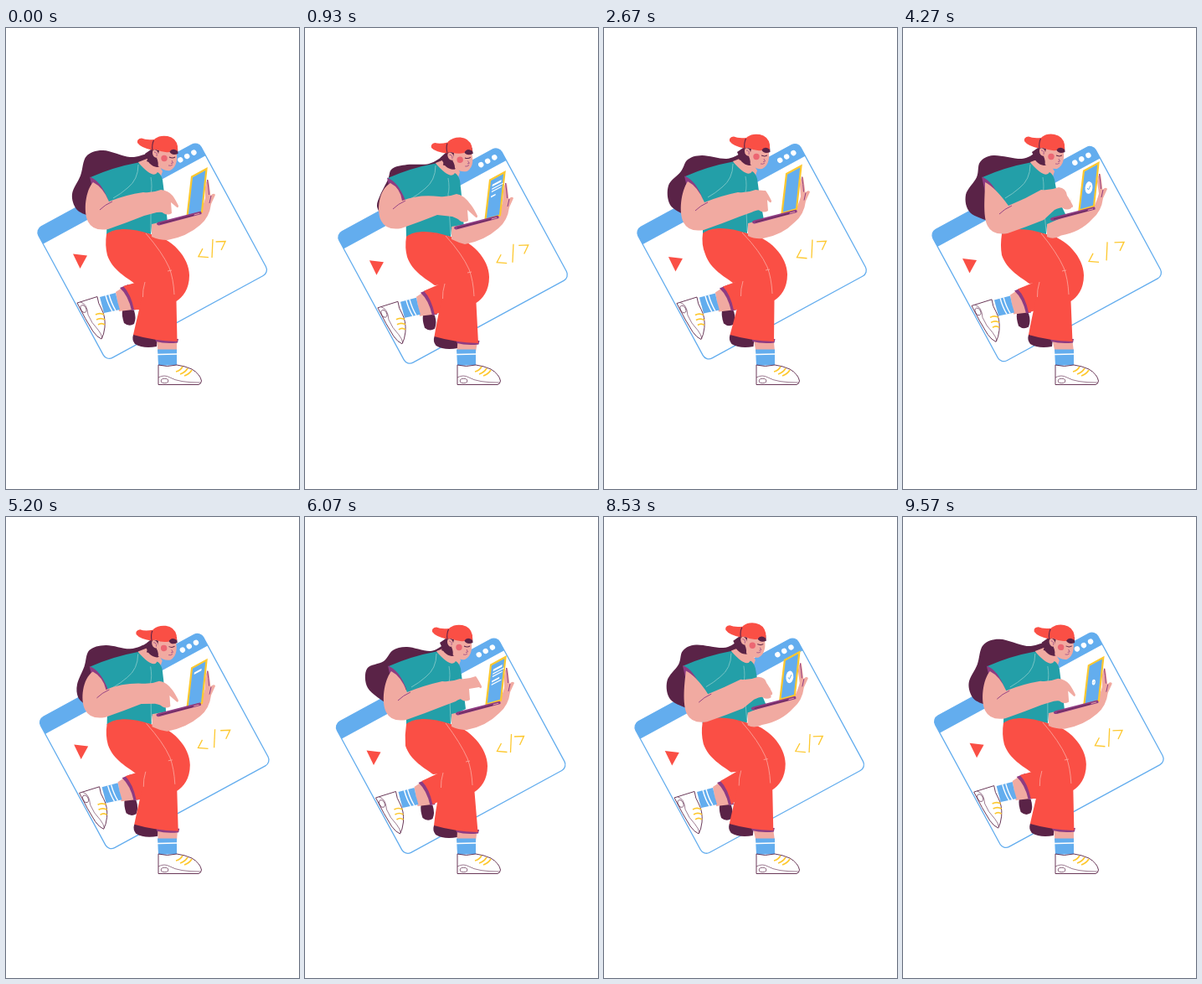
An HTML page with a canvas for the animation above (9610 ms loop, 350 by 550 pixels).

```html
<!DOCTYPE html>
<html lang="en">
<head>
<meta charset="utf-8">
<title>Coding on the move</title>
<style>
html, body { margin: 0; width: 100%; height: 100%; overflow: hidden; background: #fff; }
canvas { display: block; width: 350px; height: 550px; }
</style>
</head>
<body>
<canvas id="stage"></canvas>
<script>
const canvas = document.getElementById('stage');
const ctx = canvas.getContext('2d');
const dpr = window.devicePixelRatio || 1;
canvas.width = 350 * dpr;
canvas.height = 550 * dpr;

const LOOP = 9610, CYCLE = 4800, TAU = Math.PI * 2;
const RED = '#fa4f45', TEAL = '#239fa8', SKIN = '#f1aaa1', DARK = '#5a2347',
      PLUM = '#8e3c82', BLUE = '#63adee', YELLOW = '#fdc82f', WHITE = '#fff';

// Pose times within one cycle; the first pose is the rest pose.
const KEYS = [0, 930, 1270, 2670, 4270];
const JOINTS = {
  s: [-2, 1, -1, 0, -4, -1, -6, 0],        // shoulders
  h: [1, 3, 1, 1, -2, -1, -2, 0],          // hips
  k: [1, 2, -1, 2, 0, -1, -3, 0],          // knee
  m: [2.5, 2, 2, 2, -1.5, 0, -2, 0],       // trouser hem
  e: [-7, -1, -1, 2, -3, 1, 3, 5],         // elbow
  r: [-4, 5, 0, 0, -4, 0, 1, -3],          // wrist
  f: [0, 12, 5, -10, -6, -6, -3, 0],       // fingertip
  g: [-3, 9, -1, -3, -2, -3, 3, -6],       // other fingers
  l: [-2, 5, 0, 1, -3, -2, -4, -5.5],      // laptop base
  c: [-1, 4, 0, -1, -4, -3.5, -6, -7],     // laptop screen
  d: [-4, 2, -5, 0, -7, -2, -12, -2],      // head
  t: [-5, 2, -6, 2, -5, 3, -6, 2]          // triangle, relative to the window
};
const HAIR = [
  [168,150, 148,154, 116,146, 96,153, 89,176, 79,198, 84,216, 98,224],
  [166,152, 148,162, 122,163, 104,168, 99,181, 90,199, 86,212, 91,224],
  [166,152, 150,160, 122,155, 105,159, 94,172, 74,181, 75,204, 98,223],
  [163,150, 146,156, 117,152, 100,157, 92,171, 77,188, 79,211, 98,224],
  [158,149, 142,156, 108,152, 92,160, 88,178, 75,199, 80,220, 104,231]
];

const clamp = v => Math.max(0, Math.min(1, v));

// Cyclic cubic through one value per pose.
function cyclic(values, t) {
  const n = KEYS.length;
  const at = i => KEYS[(i + n) % n] + CYCLE * Math.floor(i / n);
  const val = i => values[(i + n) % n];
  const slope = i => (val(i + 1) - val(i - 1)) / (at(i + 1) - at(i - 1));
  let i = n - 1;
  while (KEYS[i] > t) i--;
  const d = at(i + 1) - at(i), u = (t - at(i)) / d, w = 1 - u;
  return val(i) * w * w * (1 + 2 * u) + val(i + 1) * u * u * (3 - 2 * u)
    + d * u * w * (w * slope(i) - u * slope(i + 1));
}

let joints = {};
function pose(t) {
  joints = { x: [0, 0] };
  for (const [name, v] of Object.entries(JOINTS)) {
    joints[name] = [0, 1].map(a => cyclic([0, v[a], v[2 + a], v[4 + a], v[6 + a]], t));
  }
  const a = t / 2400 * TAU;
  joints.w = [3 * Math.sin(a), 3.5 * (1 - Math.cos(a - 0.14))];
  joints.t = [joints.t[0] + joints.w[0], joints.t[1] + joints.w[1]];
}

function paint(fill, stroke, width = 1) {
  if (fill) { ctx.fillStyle = fill; ctx.fill(); }
  if (stroke) { ctx.strokeStyle = stroke; ctx.lineWidth = width; ctx.stroke(); }
}

// Path text: capitals are commands, a small letter binds the next points to a joint.
const OPS = { M: ['moveTo', 2], L: ['lineTo', 2], Q: ['quadraticCurveTo', 4], C: ['bezierCurveTo', 6] };
function shape(path, fill, stroke, width) {
  let joint = joints.x, op, nums = [];
  ctx.beginPath();
  for (const tok of path.match(/[A-Za-z]|-?[\d.]+/g)) {
    if (tok === 'Z') ctx.closePath();
    else if (OPS[tok]) op = OPS[tok];
    else if (joints[tok]) joint = joints[tok];
    else {
      nums.push(+tok + joint[nums.length % 2]);
      if (nums.length === op[1]) { ctx[op[0]](...nums); nums = []; }
    }
  }
  paint(fill, stroke, width);
}
const line = (path, color, width) => shape(path, null, color, width);

function oval(x, y, rx, ry, tilt, fill, stroke, width) {
  ctx.beginPath();
  ctx.ellipse(x, y, rx, ry, tilt, 0, TAU);
  paint(fill, stroke, width);
}

function within(draw, [x, y] = [0, 0]) {
  ctx.save();
  ctx.translate(x, y);
  draw();
  ctx.restore();
}

function browser(t) {
  within(() => {
    ctx.rotate(-28.5 * Math.PI / 180);
    ctx.beginPath();
    ctx.roundRect(-84, 228.3, 221, 178, 8);
    ctx.save();
    ctx.clip();
    ctx.fillStyle = BLUE;
    ctx.fillRect(-90, 220, 240, 27.5);
    ctx.restore();
    paint(null, BLUE, 1.3);
    for (const x of [108, 117, 126.3]) oval(x, 237.6, 3.2, 3.2, 0, WHITE);
  }, joints.w);

  const spread = 2.5 * (1 - Math.cos((t - 50) / 1200 * TAU));
  const [wx, wy] = joints.w;
  within(() => line('M235 263L230 272.5L242 273.5', YELLOW, 1.3), [wx - spread, wy + spread * 0.5]);
  within(() => line('M247 252L246 274', YELLOW, 1.3), [wx, wy]);
  within(() => line('M250.5 255L262 254.5L257 265', YELLOW, 1.3), [wx + spread, wy - spread * 0.5]);
  shape('tM80 269.5L97 271.5L88.5 287Z', RED);
}

function hair(t) {
  const p = HAIR[0].map((_, i) => cyclic(HAIR.map(row => row[i]), t));
  const pt = i => { i = Math.max(0, Math.min(7, i)); return [p[2 * i], p[2 * i + 1]]; };
  ctx.beginPath();
  ctx.moveTo(...pt(0));
  for (let i = 0; i < 7; i++) {
    const [a, b, c, d] = [i - 1, i, i + 1, i + 2].map(pt);
    ctx.bezierCurveTo(b[0] + (c[0] - a[0]) / 6, b[1] + (c[1] - a[1]) / 6,
      c[0] - (d[0] - b[0]) / 6, c[1] - (d[1] - b[1]) / 6, ...c);
  }
  const [x, y] = joints.s;
  ctx.lineTo(125 + x, 205 + y);
  ctx.lineTo(155 + x, 180 + y);
  ctx.lineTo(172 + x, 162 + y);
  paint(DARK);
}

function backLeg() {
  shape('wM139 337Q146 333 153 337Q156 346 153 353Q147 357 141 352Q138 343 139 337Z', DARK);
  shape('wM131 315L140 309L152 336L135 338Z', SKIN);
  shape('wM136 310L146 306L156 336L150 337Q146 319 136 310Z', PLUM);
  shape('wM140 308kL168 300L164 336wL153 336Q149 317 140 308Z', RED);
  shape('wM112 321L131 316Q133 327 136 336L117 340Z', BLUE);
  line('wM119 319Q122 330 127 338M123 318Q126 329 131 337', WHITE, 1.4);
  shape('wM85 328L109 320.5Q110 329 114 335Q119 344 118 357Q117 366 114 371Q109 369 104 362Q95 348 85 328Z', WHITE, DARK, 0.9);
  line('wM89 327Q97 329 98 342Q102 352 110 360Q114 365 115 370', DARK, 0.6);
  within(() => oval(92.5, 335, 3, 4.7, -0.45, null, DARK, 0.7), joints.w);
  line('wM107 342Q112 339 117 342M108 348Q113 345 118 348M110 354Q114 351 118 354', YELLOW, 1.7);
}

function frontLeg() {
  shape('mM152 366Q166 362 181 370L180 380Q164 383 154 377Q150 372 152 366Z', DARK);
  shape('mM180 370L204 370xL204 386L181.5 386Z', SKIN);
  shape('mM178 370L206 371L205 375.5Q190 377 179 374Z', PLUM);
  shape('xM181 383.5L204 383.5L204 402L182 403Z', BLUE);
  line('xM181 389.5L204 389', WHITE, 1.6);
  shape('xM182 402Q192 405 204 402Q213 403 222 407Q232 413 233.5 421Q233 425 230 425.5L182 425.5Z', WHITE, DARK, 0.9);
  line('xM182 417Q189 413 196 417Q206 423 232 423', DARK, 0.6);
  oval(189.5, 421, 4.3, 2.7, 0, null, DARK, 0.7);
  line('xM203 410Q208 409 211 404M208 413Q214 411 217 406M213 415Q219 413 222 408', YELLOW, 1.7);
}

function trousers() {
  shape('hM120 246C130 238 150 238 173 246kC198 250 219 274 219 295C219 312 211 321 203.5 326mL204.5 374Q176 373 152 366kC158 340 162 325 165 304L154 305C145 298 127 289 121 271hQ118 259 120 246Z', RED);
  line('hM167 245kQ187 268 195 286Q200 299 201 318', '#fba39a', 0.9);
  line('kM166 303Q163 313 163.5 321M193 290L198 289', '#fba39a', 0.9);
}

function torso() {
  shape('sM158 160L176 153L187 171L183 183L162 172Z', SKIN);
  shape('sM158 160.5Q128 166 101 178Q108 193 122 205hL120 247Q145 240 173 246L174 236gL193 232sQ190 204 187 181Q185 174 181 172Q176 181 158 160.5Z', TEAL);
  line('sM158 163Q158 181 145 191Q137 198 128 203', '#82c8c8', 0.9);
  line('sM173 178Q175 190 173 197hL173 243', '#82c8c8', 0.8);
}

function farArm() {
  shape('hM174 234lL205 227L231 221Q236 211 238 203cL238 190Q239 181 242 181L244.5 200Q248 196 250 199L245 210Q243 226 232 235lQ216 249 193 253hQ182 253 174 249Z', SKIN);
  line('cM240.5 181Q242 190 242.5 199M245 200L243 209', PLUM, 1);
}

function screenContent(t) {
  within(() => {
    ctx.transform(18, -9.5, -5.5, 46.5, 222, 178.5);
    ctx.strokeStyle = WHITE;
    const rows = [[0.16, 0.65, 0.055], [0.25, 0.8, 0.028], [0.32, 0.7, 0.028],
                  [0.45, 0.55, 0.04], [0.53, 0.7, 0.028]];
    const clear = clamp((2200 - t) / 200);
    rows.forEach(([y, w, thick], i) => {
      const grow = clamp((t - 250 - i * 190) / 180) * clear;
      if (!grow) return;
      ctx.beginPath();
      ctx.moveTo(0.2, y);
      ctx.lineTo(0.2 + (w - 0.05) * grow, y);
      ctx.lineWidth = thick;
      ctx.stroke();
    });
  }, joints.c);

  const size = (1 - (1 - clamp((t - 3000) / 300)) ** 3) * (1 - clamp((t - 4650) / 150) ** 2);
  if (size > 0.01) {
    within(() => {
      ctx.translate(228, 197.5);
      ctx.scale(size, size);
      oval(0, 0, 4.4, 7.4, 0.1, WHITE);
      line('M-1.8 0.5L-0.4 2.6L2 -2.6', BLUE, 1);
    }, joints.c);
  }
}

function laptop(t) {
  shape('cM222 177.5L239.5 168L234 219.5L216.5 224.5Z', BLUE, YELLOW, 2.2);
  screenContent(t);
  shape('lM180 233Q181 231.5 184 231L232 218.8Q234 219 233.5 222L184 235.3Q180 236 180 233Z', PLUM);
  line('lM184 233.5L224 223.4', DARK, 0.8);
  line('lM225 222.8L231 221.3', SKIN, 0.9);
}

function nearArm() {
  shape('sM100 177.5Q113 182 122 205L106 204Z', PLUM);
  shape('sM104 184eC95 194 92 219 98 231Q104 243 122 240Q145 232 165 224rL180 220gQ187 219 188 221Q193 224 198 221L197 208fL203 213Q206 216 206 212Q202 204 199 200rQ194 194 185 193Q175 197 164 196eQ143 199 123 207sQ116 190 104 184Z', SKIN);
  line('eM112 217Q118 211 127 207', PLUM, 0.9);
  line('rM186 204Q190 206gL192 211M190 204L195 211', PLUM, 0.8);
}

function head(t) {
  const [x, y] = joints.d;
  within(() => {
    ctx.translate(187, 154);
    ctx.rotate(cyclic([0, -0.13, 0, 0, 0], t));
    ctx.translate(-187, -154);
    shape('M166 150L176 143L185 148L184 165Q178 168 171 161Z', DARK);
    shape('M174 144L203 146Q205 154 203.5 160Q202 167 196 170Q188 171 181 164Q173 157 174 144Z', SKIN);
    shape('M174 144L183 146Q182 152 180 155Q183 162 181 166Q175 161 168 159Z', DARK);
    oval(178.5, 150, 3.3, 5, -0.35, SKIN);
    line('M177 148Q181 148 180 153', PLUM, 0.7);
    oval(189, 155.5, 3.7, 3.7, 0, '#ec6672');
    shape('M195 147Q198 143 205 143L205.5 150Q198 153 195 147Z', DARK);
    line('M195 154Q199 156 202 154', DARK, 1);
    line('M198 158L199.5 161L197 161.5M194 164Q197 165 199 163', PLUM, 0.7);
    shape('M177 133Q167 134 162 131.5Q156 132 157 137Q161 143 176 146Z', RED);
    shape('M174.5 145Q173 136 178 132Q184 127.5 193 129Q203 131 205 141L205 147Q199 142 195 148Q187 149 180 145Z', RED);
    line('M176.5 134Q174 139 175 146', DARK, 1.1);
  }, [x, y]);
}

function frame(now) {
  const t = (now % LOOP) / (LOOP / 2) % 1 * CYCLE;
  ctx.setTransform(dpr, 0, 0, dpr, 0, 0);
  ctx.fillStyle = WHITE;
  ctx.fillRect(0, 0, 350, 550);
  pose(t);
  browser(t);
  hair(t);
  backLeg();
  frontLeg();
  torso();
  trousers();
  farArm();
  laptop(t);
  nearArm();
  head(t);
}

const start = performance.now();
function tick() {
  frame(performance.now() - start);
  requestAnimationFrame(tick);
}
tick();
</script>
</body>
</html>
```
